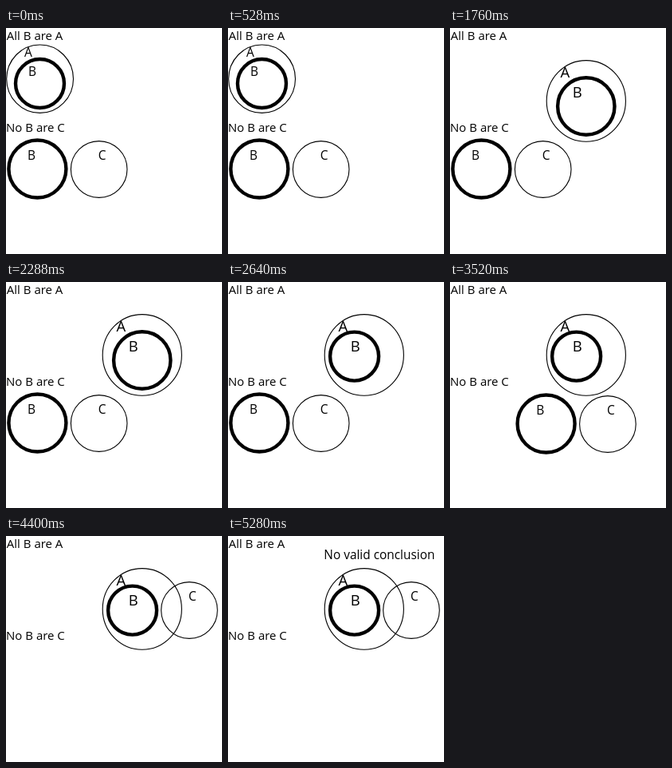
Recreate the animation shown at these times as an HTML page with a canvas. Size 271 px wide and 283 px high, loop 6.16 s.

```html
<!DOCTYPE html>
<html lang="en">
<head>
<meta charset="utf-8">
<style>
  html, body { margin: 0; width: 100%; height: 100%; overflow: hidden; background: #fff; }
  canvas { display: block; }
</style>
</head>
<body>
<canvas id="stage" width="271" height="283"></canvas>
<script>
const ctx = document.getElementById('stage').getContext('2d');
const STEP = 880, STEPS = 7;
const THIN = 1.1, THICK = 4.4;
const SMALL = 15.5, LARGE = 18.5;

function ring(x, y, rx, ry, width) {
  ctx.lineWidth = width;
  ctx.beginPath();
  ctx.ellipse(x, y, rx, ry, 0, 0, Math.PI * 2);
  ctx.stroke();
}

function text(string, x, y, size) {
  ctx.font = `${size}px "Open Sans", "Noto Sans", sans-serif`;
  ctx.fillText(string, x, y);
}

function drawFirstPremise(step) {
  if (step === 0) {
    ring(42.6, 63.7, 41.9, 42.7, THIN);
    ring(42.5, 69.5, 30.5, 30.5, THICK);
    text('A', 23, 36, SMALL);
    text('B', 28, 60, SMALL);
  } else if (step === 1) {
    ring(107.4, 65.5, 49.6, 50.8, THIN);
    ring(107.4, 72, 35.7, 35.7, THICK);
    text('A', 84.7, 32, LARGE);
    text('B', 90, 61, LARGE);
  } else {
    ring(170.8, 91.4, 49.6, 50.8, THIN);
    if (step === 2) ring(170.8, 98, 35.7, 35.7, THICK);
    else ring(158.6, 93.1, 30.5, 30.5, THICK);
    text('A', 138.5, 62, LARGE);
    text('B', 153.7, 87, LARGE);
  }
}

function drawSecondPremise(step) {
  if (step < 5) {
    const dx = step === 4 ? 81.2 : 0;
    const dy = step === 4 ? 1 : 0;
    ring(39.4 + dx, 176.5 + dy, 36, 36, THICK);
    text('B', 27 + dx, 165 + dy, SMALL);
    ring(116.7 + dx, 177 + dy, 35.3, 35.4, THIN);
    text('C', 115.7 + dx, 165 + dy, SMALL);
  } else {
    ring(230, 93, 35.3, 35.4, THIN);
    text('C', 229, 81, SMALL);
  }
}

function draw(now) {
  const step = Math.floor(now / STEP) % STEPS;
  ctx.fillStyle = '#fff';
  ctx.fillRect(0, 0, 271, 283);
  ctx.fillStyle = ctx.strokeStyle = '#000';
  text('All B are A', 0.8, 15, 15);
  text('No B are C', 0, 130, 15);
  drawFirstPremise(step);
  drawSecondPremise(step);
  if (step === 6) text('No valid conclusion', 120.3, 29, 15.4);
}

const start = performance.now();
function tick() {
  draw(performance.now() - start);
  requestAnimationFrame(tick);
}
tick();
</script>
</body>
</html>
```
